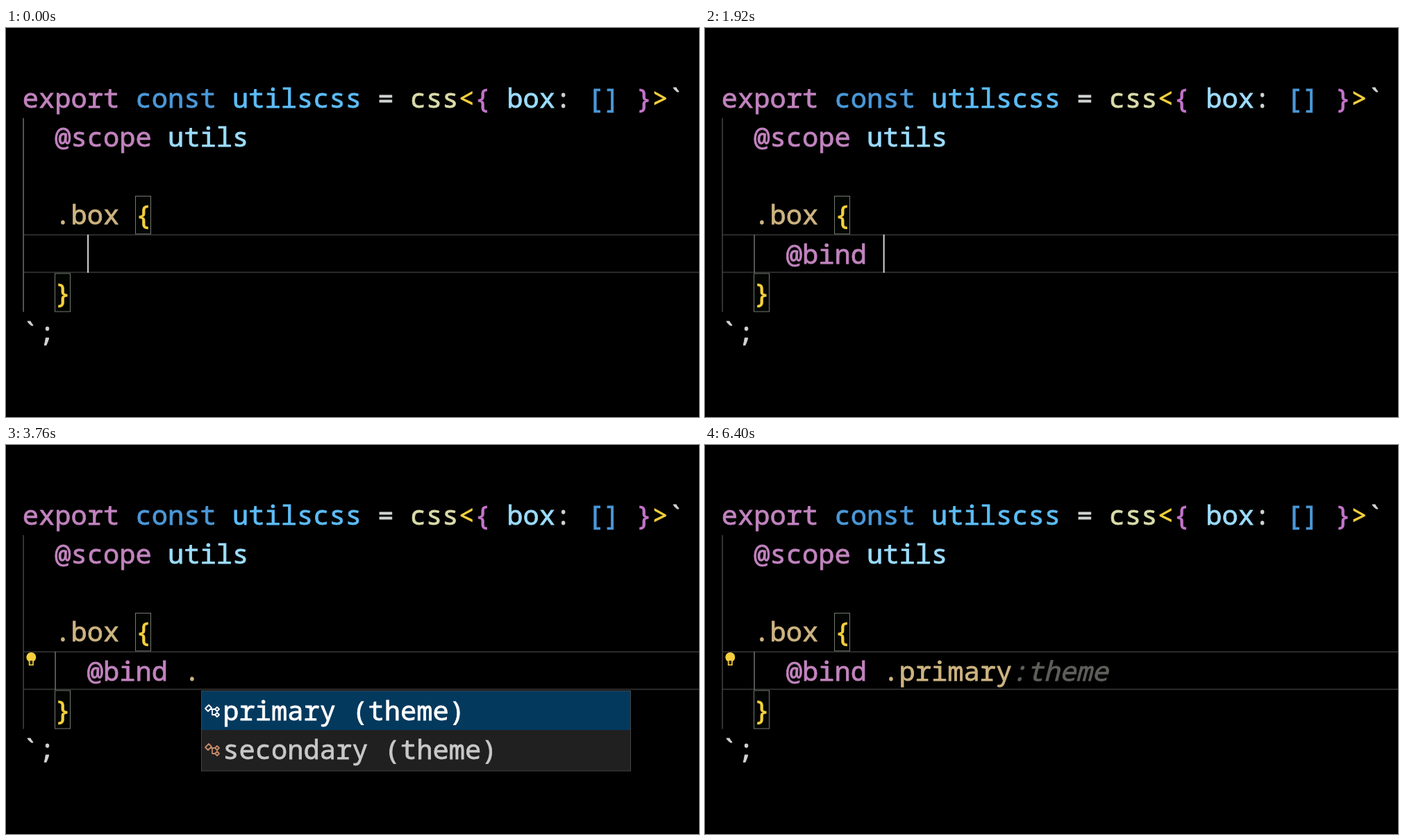
Recreate the animation shown at these times as an HTML page. Size 998 px wide and 561 px high, loop 6.48 s.

```html
<!DOCTYPE html>
<html lang="en">
<head>
<meta charset="utf-8">
<title>Editor autocomplete</title>
<style>
  html, body { margin: 0; width: 100%; height: 100%; overflow: hidden; background: #000; }
  svg { display: block; width: 100%; height: 100%; }
  text { font: 38.75px "Noto Sans Mono", "DejaVu Sans Mono", monospace; white-space: pre; stroke-width: .8px; }
</style>
</head>
<body>
<svg id="stage" viewBox="0 0 998 561"></svg>
<script>
const LOOP = 6480, STEP = 80;
const LEFT = 23.7, ADVANCE = 23.25, BASE = 114.8, LINE = 56.2;
const C = {
  pink: '#c183be', blue: '#4b98d8', sky: '#5cbcf6', pale: '#9cdcfe', plain: '#d0d4d2',
  call: '#dadbaa', gold: '#f4d03c', violet: '#c274c8', tan: '#cdb380', ghost: '#5e5e5a'
};
const stage = document.getElementById('stage');
const col = n => LEFT + n * ADVANCE;

const rect = (x, y, w, h, fill, stroke = 'none') =>
  `<rect x="${x}" y="${y}" width="${w}" height="${h}" fill="${fill}" stroke="${stroke}"/>`;

const text = (x, y, spans) => `<text x="${x}" y="${y}">` + spans.map(([str, color, style = 'normal']) =>
  `<tspan fill="${color}" stroke="${color}" font-style="${style}">${str.replace(/</g, '&lt;')}</tspan>`
).join('') + '</text>';

const line = (row, start, ...spans) => text(col(start), BASE + row * LINE, spans);

const icons = {
  bolt: (x, y, color) => `<path transform="translate(${x} ${y})" d="M-2-9H6L2-2H6L-5 9L-3 2H-6Z"
    fill="none" stroke="${color}" stroke-width="1.8" stroke-linejoin="round"/>`,
  node: (x, y, color) => `<path transform="translate(${x} ${y})"
    d="M-9-3L-4-8L0-4L-5 1ZM-2-2H5M1-2V6H5M8-5L11-2L8 1L5-2ZM8 3L11 6L8 9L5 6Z"
    fill="none" stroke="${color}" stroke-width="1.8" stroke-linejoin="round"/>`
};

function popup(x, icon, tint, first, second) {
  return rect(x + .5, 354.5, 618, 115.5, '#202020', '#454545') +
    rect(x + 1, 355, 617, 56, '#04395e') +
    icons[icon](x + 15, 383, '#fff') + icons[icon](x + 15, 439, tint) +
    text(x + 31.3, 396.8, [[first, '#fff']]) + text(x + 31.3, 453.2, [[second, '#c8c8c8']]);
}

const detail = rect(760.5, 354.5, 260, 124, '#202020', '#454545') +
  text(765.3, 402, [['CSS-CTRL B', '#9a9894']]) + text(765.3, 458, [['ctive (in', '#9a9894']]);

const bulb = `<circle cx="36.3" cy="306" r="7" fill="#f6cf3e"/>
  <path d="M33.6 311V317.3H39V311" fill="#2a2408" stroke="#f6cf3e" stroke-width="1.6"/>`;

const code =
  line(0, 0, ['export ', C.pink], ['const ', C.blue], ['utilscss ', C.sky], ['= ', C.plain],
    ['css', C.call], ['<', C.gold], ['{ ', C.violet], ['box', C.pale], [': ', C.plain],
    ['[] ', C.blue], ['}', C.violet], ['>', C.gold], ['`', C.plain]) +
  line(1, 2, ['@scope ', C.pink], ['utils', C.pale]) +
  line(3, 2, ['.box ', C.tan], ['{', C.gold]) +
  line(5, 2, ['}', C.gold]) +
  line(6, 0, ['`;', C.plain]);

const frame = rect(25, 297.5, 990, 1.7, '#343434') + rect(25, 351.5, 990, 1.7, '#343434') +
  rect(186.5, 242.5, 22, 54.5, '#020402', '#747a72') + rect(70.5, 354, 22, 55, '#020402', '#747a72');

// What has been typed on the active line, by start time
const typed = [
  [0, []],
  [480, [['@', C.plain]]],
  [1280, [['@bind', C.pink]]],
  [1920, [['@bind ', C.pink]]],
  [2320, [['@bind ', C.pink], ['.', C.tan]]],
  [4320, [['@bind ', C.pink], ['.primary', C.tan]]]
];

// Times at which the caret shows
const caretOn = [[0, 80], [480, 1040], [1280, 1840], [1920, 2800], [3280, 3760], [4320, 4880], [5440, 5920]];

function draw(ms) {
  const t = Math.floor((ms % LOOP) / STEP) * STEP;
  const within = (from, to) => t >= from && t < to;
  const spans = typed.filter(([start]) => t >= start).pop()[1];
  const end = 4 + spans.reduce((sum, [str]) => sum + str.length, 0);
  const empty = !spans.length;

  let out = rect(0, 0, 998, 561, '#000') + frame;
  out += rect(24.3, 130, 1.5, 279.5, empty ? '#6c6c6c' : '#444');
  if (!empty) out += rect(70.3, 298, 1.5, 55, '#707070');
  out += code + line(4, 4, ...spans);
  if (t >= 4320) out += line(4, end - .05, [':theme', C.ghost, 'italic']);
  if (t >= 2720) out += bulb;
  if (caretOn.some(span => within(...span))) out += rect(col(end) + .4, 298, 2, 55, '#d0d6d4');
  if (within(560, 1280)) out += popup(141, 'bolt', '#a58a6c', 'bind', 'use') + detail;
  if (within(2320, 4320)) out += popup(281, 'node', '#c58a68', 'primary (theme)', 'secondary (theme)');
  return out;
}

let shown = '';
const begin = performance.now();
function tick() {
  const next = draw(performance.now() - begin);
  if (next !== shown) stage.innerHTML = shown = next;
  requestAnimationFrame(tick);
}
tick();
</script>
</body>
</html>
```
